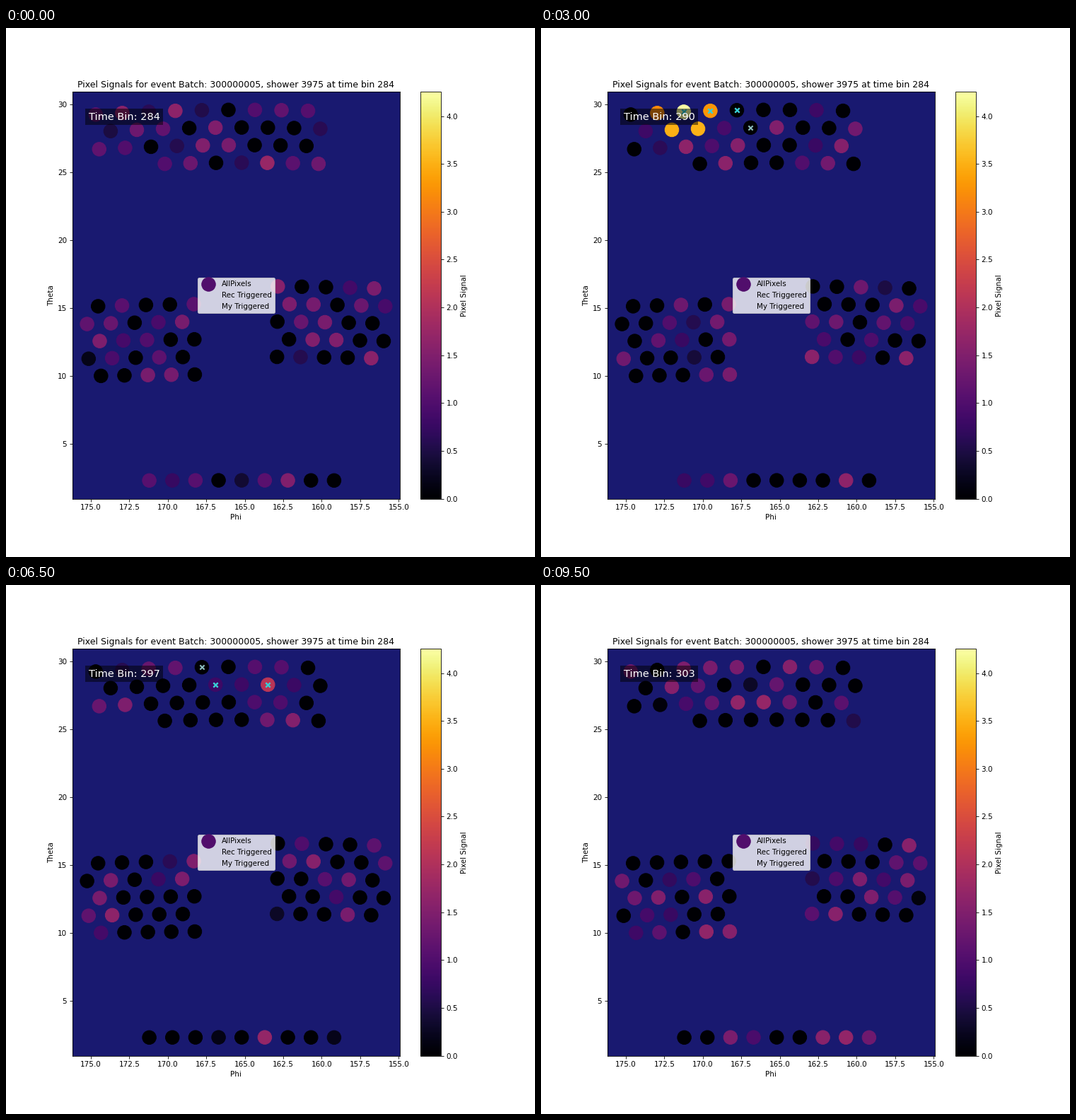
Write a matplotlib script that moves like this. It is 748 px wide and 748 px high and loops after 10000 ms.

```python
import numpy as np
import matplotlib.pyplot as plt
from matplotlib.animation import FuncAnimation

FRAMES, FIRST_BIN = 20, 284
CENTER_PHI, ROW_STEP = 165.2, 1.297
VMAX = 4.257

# Places the shower crosses, as (phi, theta), and when it reaches them
STOPS = np.array([(171.2, 29.4), (169.5, 29.5), (167.8, 29.5), (166.9, 28.3), (163.5, 28.3)])
STOP_TIMES = np.linspace(7, 11.5, len(STOPS))


def block(theta, rows, first, count, shifted=False):
    """Honeycomb of pixels: every other row moves half a pitch to the left."""
    points = []
    for row in range(rows):
        level = theta + row * ROW_STEP
        pitch = 1.5 / np.cos(np.radians(level))
        half = 0.5 * ((row + shifted) % 2)
        offset = -(first - half + np.arange(count)) * pitch
        points.append(np.column_stack([CENTER_PHI + offset,
                                       level - 0.00013 * level * offset ** 2]))
    return np.concatenate(points)


def pixel_signals():
    """Log of clipped noise, plus a fading spot that follows the stops."""
    rng = np.random.default_rng(3975)
    signals = np.log10(np.clip(rng.normal(0, 22, (FRAMES, len(pixels))), 1, None))
    for time in range(6, 14):
        front = [np.interp(time, STOP_TIMES, axis) for axis in STOPS.T]
        distance = np.hypot(*(pixels - front).T)
        spot = 4.2 - 0.35 * (time - 7) - 0.45 * distance ** 2
        signals[time] = np.maximum(signals[time], spot)
    return signals


def triggered(frame, trim=0):
    """Each stop stays triggered for nine frames, one frame after the last stop."""
    age = frame - 3 - np.arange(len(STOPS))
    return trigger_pixels[(age >= trim) & (age <= 8 - trim)]


pixels = np.concatenate([
    block(25.68, 1, -3, 7),
    block(25.68 + ROW_STEP, 3, -5, 9, shifted=True),
    block(10.10, 5, -6, 5),
    block(10.10 + ROW_STEP, 5, 2, 5, shifted=True),
    block(2.30, 1, -4, 9),
])
trigger_pixels = np.array([pixels[np.hypot(*(pixels - stop).T).argmin()] for stop in STOPS])
signals = pixel_signals()

fig, ax = plt.subplots(figsize=(10, 10), dpi=74.8)
ax.set_facecolor("midnightblue")
dots = ax.scatter(*pixels.T, c=signals[0], s=350, cmap="inferno", vmin=0, vmax=VMAX)
rec_marks = ax.scatter([], [], marker="x", s=36, linewidths=2, color="#8fbfc0")
my_marks = ax.scatter([], [], marker="x", s=36, linewidths=2, color="#30d0d8")
fig.colorbar(dots, ax=ax, label="Pixel Signal")

ax.set(xlim=(176.218, 154.905), ylim=(0.94, 30.924), xlabel="Phi", ylabel="Theta")
ax.set_title("Pixel Signals for event Batch: 300000005, shower 3975 at time bin 284")

handles = [ax.scatter([], [], s=350, color=plt.get_cmap("inferno")(0.235)),
           ax.scatter([], [], color="none"), ax.scatter([], [], color="none")]
ax.legend(handles, ["AllPixels", "Rec Triggered", "My Triggered"], loc="center",
          labelspacing=0.58, handletextpad=0.85)

clock = ax.text(0.05, 0.95, "", transform=ax.transAxes, color="white", fontsize=14,
                va="top", bbox=dict(facecolor="black", alpha=0.5, edgecolor="none"))


def update(frame):
    dots.set_array(signals[frame])
    rec_marks.set_offsets(triggered(frame))
    my_marks.set_offsets(triggered(frame, trim=1))
    clock.set_text(f"Time Bin: {FIRST_BIN + frame}")
    return dots, rec_marks, my_marks, clock


animation = FuncAnimation(fig, update, frames=FRAMES, interval=500,
                          repeat=True, repeat_delay=0)
plt.show()
```
